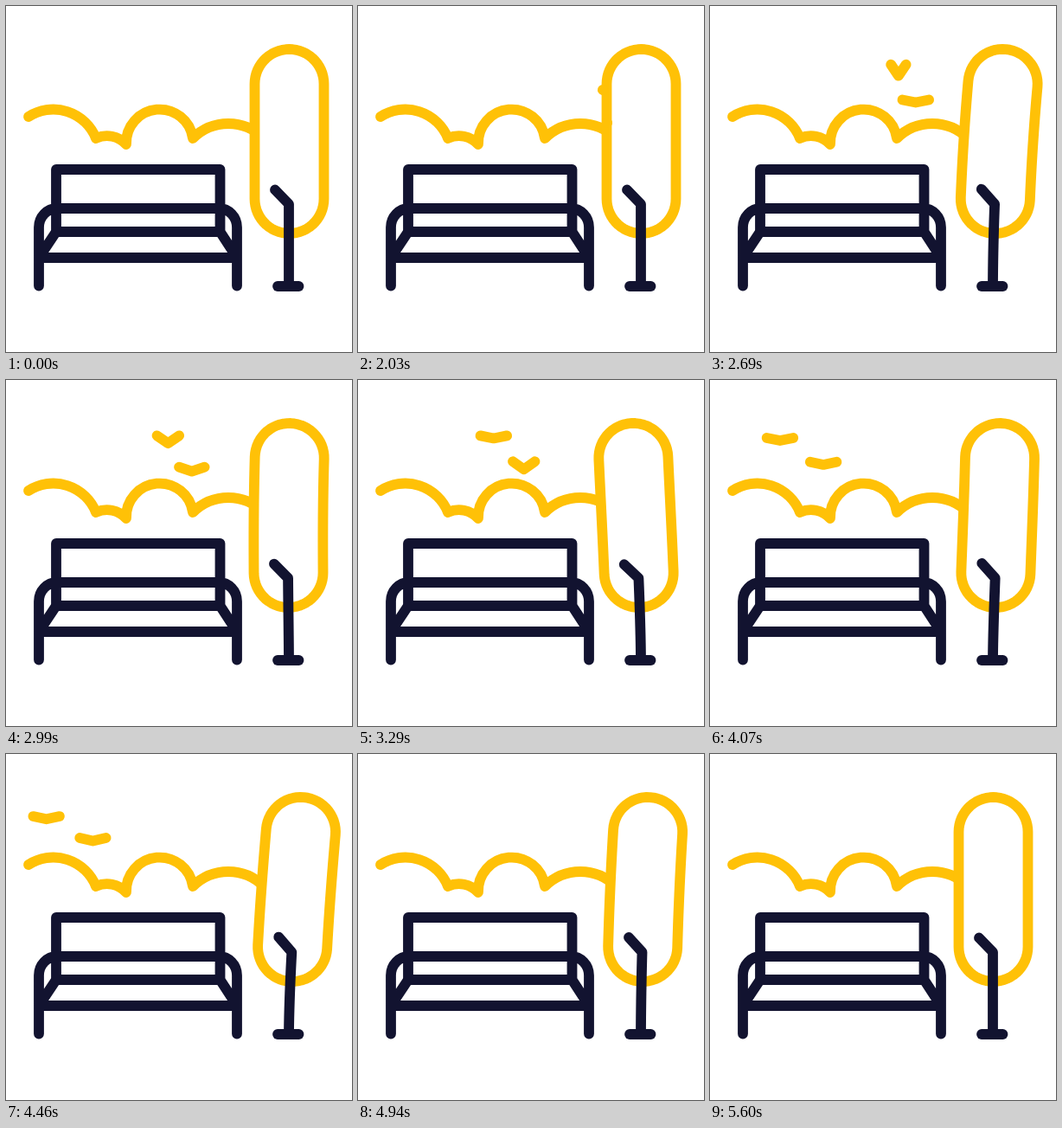
Animation, 400 px wide and 400 px high, one loop 6.95 s. Source, as an HTML page with a canvas:

```html
<!DOCTYPE html>
<html lang="en">
<head>
<meta charset="utf-8">
<title>Park bench</title>
<style>
html, body { margin: 0; width: 100%; height: 100%; overflow: hidden; background: #fff; }
canvas { display: block; width: 400px; height: 400px; }
</style>
</head>
<body>
<canvas id="stage" width="400" height="400"></canvas>
<script>
const ctx = document.getElementById('stage').getContext('2d');
const GOLD = '#ffc107', NAVY = '#121330';
const LOOP = 6950, START = 2030, STEP = 30, FLIGHT = 2850;
const ROOT = { x: 327, y: 324 };

const hedge = new Path2D('M26 128A53 53 0 0 1 104 153A30 30 0 0 1 139 160A38.7 38.7 0 0 1 216 153A58 58 0 0 1 298 153');
const bench = new Path2D('M58 261V189H247.5V261M38 323.5V256A21 22 0 0 1 59 234H246A21 22 0 0 1 267 256V323.5M38 291H267L247.5 261H58Z');
const foot = new Path2D('M314 324H338.5');

// Each bird flies along a cubic curve given by four control points.
const birds = [
  { path: [[283, 97], [193, 52], [82, 63], [14, 81]], period: 400, phase: .17 },
  { path: [[288, 135], [216, 88], [143, 92], [67, 103]], period: 348, phase: 3.1 }
];

const clamp = v => Math.min(1, Math.max(0, v));
const ease = u => (1 - Math.cos(Math.PI * clamp(u))) / 2;
const spread = (n, f) => Array.from({ length: n + 1 }, (_, i) => f(i / n));

// Turning points of the sway: right, left, right, rest.
function swing(t) {
  return ease((t - 2030) / 310) - 1.75 * ease((t - 2340) / 900)
    + 1.75 * ease((t - 3240) / 1000) - ease((t - 4240) / 1170);
}

// Sideways shift at height h; higher parts move further and later.
const shift = (h, t) => 13.4 * (Math.max(0, h) / 234) ** 1.5 * swing(t - .7 * h);

function bend([x, y], t) {
  const h = ROOT.y - y, dx = shift(h, t);
  return [x + dx, y + (x - ROOT.x) * (shift(h + 1, t) - dx)];
}

const arc = (cy, from) => spread(30, u =>
  [327.5 + 40 * Math.cos(from + Math.PI * u), cy + 40 * Math.sin(from + Math.PI * u)]);
const crown = [
  ...arc(90, Math.PI), ...spread(15, u => [367.5, 90 + 133 * u]),
  ...arc(223, 0), ...spread(15, u => [287.5, 223 - 133 * u])
];
const trunk = [[311, 212.5], ...spread(10, u => [327, 229 + 95 * u])];

function line(points, color, closed) {
  ctx.beginPath();
  points.forEach(p => ctx.lineTo(...p));
  if (closed) {
    ctx.closePath();
    ctx.fill();
  }
  ctx.strokeStyle = color;
  ctx.stroke();
}

function strokePath(path, color) {
  ctx.strokeStyle = color;
  ctx.stroke(path);
}

function drawTree(t) {
  line(crown.map(p => bend(p, t)), GOLD, true);
  line(trunk.map(p => bend(p, t)), NAVY);
  strokePath(foot, NAVY);
}

function drawBird({ path, period, phase }, time) {
  const u = clamp(time / FLIGHT), v = 1 - u;
  const [x, y] = [0, 1].map(k => v ** 3 * path[0][k] + 3 * v * v * u * path[1][k]
    + 3 * v * u * u * path[2][k] + u ** 3 * path[3][k]);
  const size = Math.max(.01, clamp(time / 240) * clamp((FLIGHT - time) / 240));
  const drop = 8 + 5 * Math.cos(2 * Math.PI * (time - 660) / period + phase);
  const w = size * Math.sqrt(15.6 ** 2 - drop ** 2), d = size * drop / 2;
  line([[x - w, y - d], [x, y + d], [x + w, y - d]], GOLD);
}

function draw(now) {
  const time = Math.floor((now % LOOP - START) / STEP) * STEP;
  ctx.fillStyle = '#fff';
  ctx.fillRect(0, 0, 400, 400);
  ctx.lineWidth = 11.8;
  ctx.lineCap = ctx.lineJoin = 'round';
  strokePath(hedge, GOLD);
  drawTree(START + time);
  strokePath(bench, NAVY);
  if (time >= 0 && time <= FLIGHT) birds.forEach(b => drawBird(b, time));
}

const begin = performance.now();
function tick() {
  draw(performance.now() - begin);
  requestAnimationFrame(tick);
}
tick();
</script>
</body>
</html>
```
